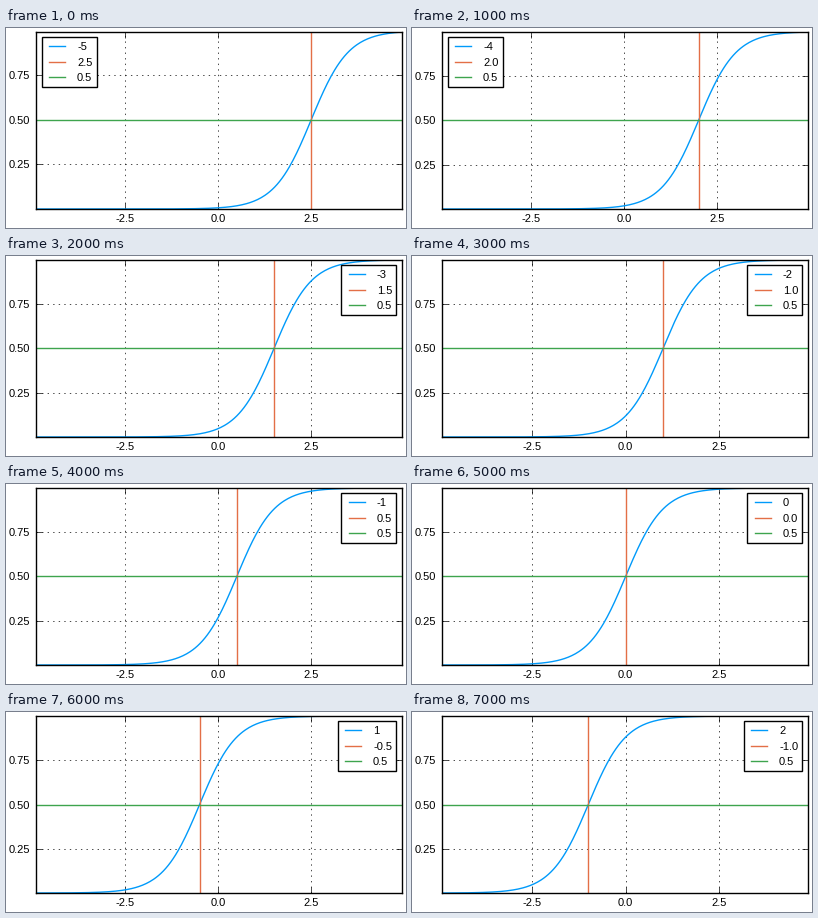
A matplotlib script that plays this animation: 400x200 px, repeating every 8000 ms.

```python
import numpy as np
import matplotlib.pyplot as plt
from matplotlib.animation import FuncAnimation
from matplotlib.patches import Rectangle

W, H, DPI = 400, 200, 100
LEFT, RIGHT, TOP, BOTTOM = 30, 396, 4, 181
BLUE, ORANGE, GREEN = "#009afa", "#e36f47", "#3ea44e"
X_TICKS = (-2.5, 0.0, 2.5)
Y_TICKS = (0.25, 0.5, 0.75)
WIDE, SHIFTED = (-4.898, 4.941), (-4.916, 4.883)
FONT = 8
EM = FONT * DPI / 72

plt.rcParams["font.family"] = "Liberation Sans"
fig = plt.figure(figsize=(W / DPI, H / DPI), dpi=DPI, facecolor="white")


def sigmoid(x, bias):
    return 1 / (1 + np.exp(-(2 * x + bias)))


def draw_plot(bias, xlim):
    ax = fig.add_axes([LEFT / W, 1 - BOTTOM / H,
                       (RIGHT - LEFT) / W, (BOTTOM - TOP) / H])
    x = np.linspace(*xlim, 300)
    y = sigmoid(x, bias)
    ax.plot(x, y, color=BLUE, lw=1)
    ax.axvline(-bias / 2, color=ORANGE, lw=1)
    ax.axhline(0.5, color=GREEN, lw=1)
    ax.set(xlim=xlim, ylim=(y[0], y[-1]), xticks=X_TICKS, yticks=Y_TICKS)
    ax.set_axisbelow(True)
    ax.grid(True, color="black", lw=0.5, ls=(0, (2, 6)))
    ax.tick_params(direction="in", length=4, width=0.5, top=True, right=True,
                   labelbottom=False, labelleft=False)
    for spine in ax.spines.values():
        spine.set_linewidth(1)
    return y[0], y[-1]


def draw_labels(layer, xlim, ylim):
    for t in X_TICKS:
        px = LEFT + (t - xlim[0]) / (xlim[1] - xlim[0]) * (RIGHT - LEFT)
        layer.text(px, 194, f"{t:.1f}", ha="center", fontsize=FONT)
    for t in Y_TICKS:
        py = BOTTOM - (t - ylim[0]) / (ylim[1] - ylim[0]) * (BOTTOM - TOP)
        layer.text(LEFT - EM / 2, round(py) + 4, f"{t:.2f}", ha="right",
                   fontsize=FONT)


def draw_legend(layer, bias):
    names = (str(bias), f"{-bias / 2:.1f}", "0.5")
    width = 58.9 if bias > 0 else 55.2
    x = LEFT + EM / 2 if bias <= -4 else RIGHT - EM / 2 - width
    layer.add_patch(Rectangle((x, 9), width, 50, fc="white", ec="black", lw=1))
    for name, color, y in zip(names, (BLUE, ORANGE, GREEN), (18, 34, 49)):
        layer.plot([x + 0.7 * EM, x + 2.1 * EM], [y, y], color=color, lw=1)
        layer.text(x + 3.2 * EM, y + 4, name, fontsize=FONT)


def update(i):
    bias = i - 5
    xlim = SHIFTED if i >= 3 and i % 2 else WIDE
    fig.clear()
    ylim = draw_plot(bias, xlim)
    # Overlay in pixel units, y pointing down
    layer = fig.add_axes([0, 0, 1, 1])
    layer.axis("off")
    draw_labels(layer, xlim, ylim)
    draw_legend(layer, bias)
    layer.set(xlim=(0, W), ylim=(H, 0))
    return []


anim = FuncAnimation(fig, update, frames=8, interval=1000, repeat=True,
                     repeat_delay=0, init_func=lambda: [], blit=False)
plt.show()
```
